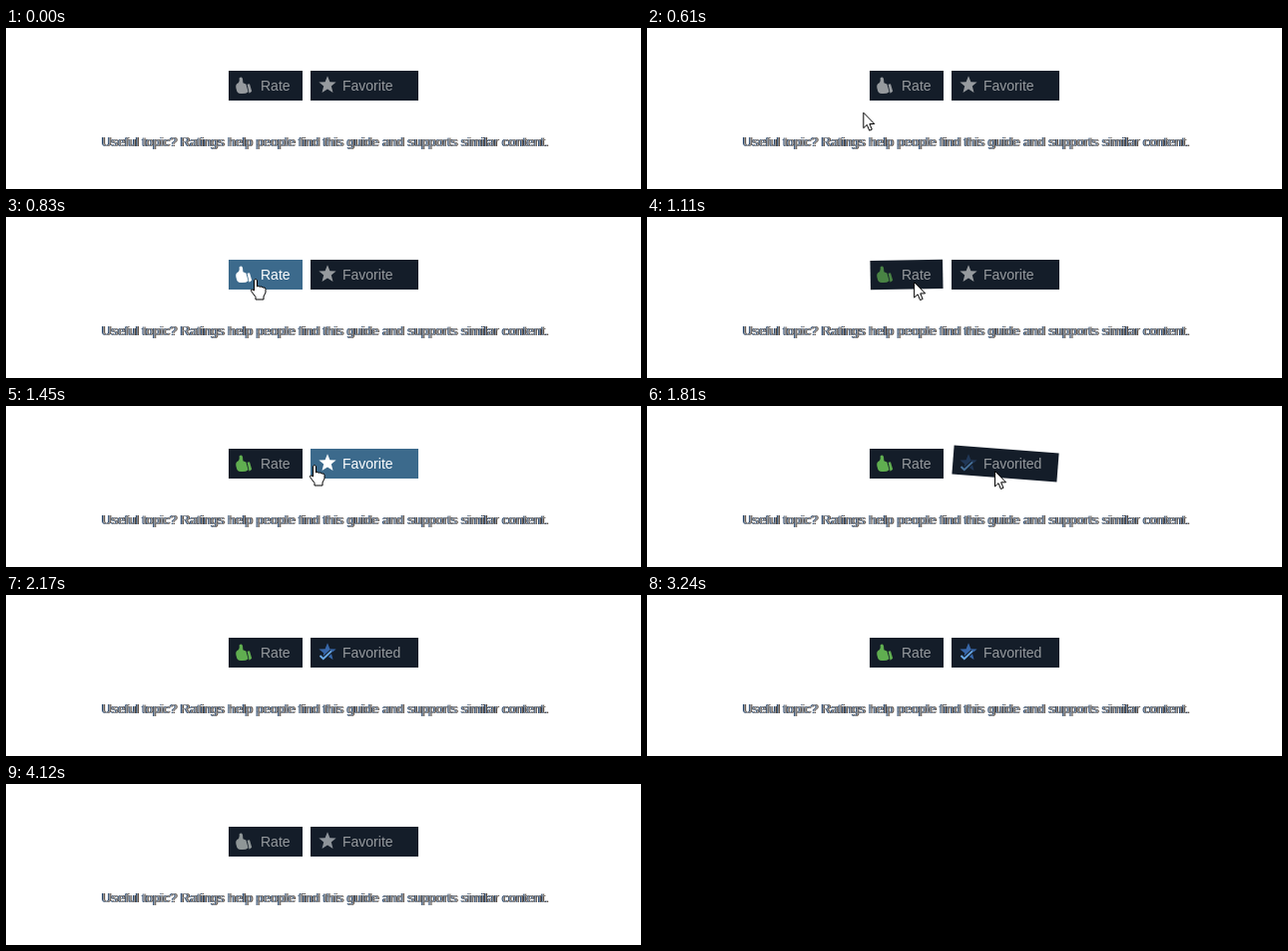
An HTML page for the animation above (4180 ms loop, 636 by 162 pixels).

```html
<!DOCTYPE html>
<html lang="en">
<head>
<meta charset="utf-8">
<title>Rate and favorite</title>
<style>
  html, body { margin: 0; width: 100%; height: 100%; overflow: hidden; background: #fff; }
  svg { display: block; width: 636px; height: 162px; }
  text { font: 14px "Liberation Sans", Arial, sans-serif; }
  .note { font-size: 13px; }
  #cursor path { fill: #fff; stroke: #000; stroke-linejoin: round; }
</style>
</head>
<body>
<svg viewBox="0 0 636 162">
  <defs>
    <g id="thumb">
      <path d="M233.6 50.6Q235.6 48.4 237 51L237.4 55.2 240.4 56.6 242.6 64.2Q240 66.6 235 66Q231.4 65.8 230.8 62Q229.4 57.6 231.4 56Q234.4 55 233.6 50.6Z"/>
      <path d="M241.6 56.8L244 56.2 246.2 63.8 243.6 65.8Z"/>
    </g>
    <path id="star" d="M322 48.3L324.4 54.3 330.6 54.6 325.8 58.6 327.5 65 322 61.4 316.5 65 318.2 58.6 313.4 54.6 319.6 54.3Z"/>
  </defs>

  <g id="rate">
    <rect x="223" y="43" width="74" height="30"/>
    <use class="off" href="#thumb"/>
    <use class="on" href="#thumb" fill="#60ae50"/>
    <text x="255" y="63">Rate</text>
  </g>

  <g id="favorite">
    <rect x="305" y="43" width="108" height="30"/>
    <use class="off" href="#star"/>
    <g class="on">
      <use href="#star" fill="#3766a8"/>
      <path d="M314.5 61L317.8 64.2 326 56.4" fill="none" stroke="#141d29" stroke-width="4"/>
      <path d="M314.5 61L317.8 64.2 326 56.4" fill="none" stroke="#6aa9e6" stroke-width="2"/>
    </g>
    <text x="337" y="63">Favorite<tspan class="on">d</tspan></text>
  </g>

  <g class="note">
    <text class="note" x="95" y="119" fill="#27476e">Useful topic? Ratings help people find this guide and supports similar content.</text>
    <text class="note" x="97" y="119" fill="#5a4a3c" aria-hidden="true">Useful topic? Ratings help people find this guide and supports similar content.</text>
    <text class="note" x="96" y="119" fill="#8e959e" aria-hidden="true">Useful topic? Ratings help people find this guide and supports similar content.</text>
  </g>

  <g id="cursor">
    <path id="arrow" d="M.5 .5V16L4 12.7 6.4 18.5 9 17.4 6.6 11.8H11.5Z"/>
    <path id="hand" d="M-1.5 1.5Q0-.5 1.5 1.5V8Q3 6.8 4.3 8.3 6 7.2 7.2 9 9.5 8.2 10 10.5V14L8 18V21H0V18.5L-4.5 12.5Q-5 9.5-1.5 12Z"/>
  </g>
</svg>

<script>
const LOOP = 4180, SHAKE = 400;
const ENTER = 510, LEAVE = 2170;
const RESET = 3240, RESET_END = 4150;
const $ = id => document.getElementById(id);
const clamp = v => Math.max(0, Math.min(1, v));

// time, x, y of the pointer tip
const route = [
  [510, 201, 95], [830, 250, 62], [900, 252, 62], [1060, 261, 66],
  [1450, 309, 59], [1640, 339, 57], [1700, 341, 58], [1810, 348, 65], [2150, 383, 95]
];
const buttons = [
  { el: $("rate"), x: 223, w: 74, click: 900 },
  { el: $("favorite"), x: 305, w: 108, click: 1660 }
];

function pointerAt(t) {
  let i = 1;
  while (i < route.length - 1 && t > route[i][0]) i++;
  const [t0, x0, y0] = route[i - 1], [t1, x1, y1] = route[i];
  const k = clamp((t - t0) / (t1 - t0));
  return [x0 + (x1 - x0) * k, y0 + (y1 - y0) * k];
}

function drawButton({ el, x, w, click }, t, px, py) {
  const since = t - click, clicked = since >= 0;
  const hover = t >= ENTER && !clicked && px >= x && px < x + w && py >= 43 && py < 73;
  const back = clamp((t - RESET) / (RESET_END - RESET));
  const ink = hover ? "#fff" : "#969a9e";

  const left = clicked ? clamp(1 - since / SHAKE) : 0;
  const angle = -7 * left * Math.sin(since * Math.PI / 100);
  const rect = el.querySelector("rect");
  rect.setAttribute("fill", hover ? "#3c6a8c" : "#141d29");
  rect.setAttribute("transform",
    `translate(${x + w / 2} 58) rotate(${angle}) scale(${1 - .04 * left}) translate(${-x - w / 2} -58)`);

  el.querySelector("text").setAttribute("fill", ink);
  const off = el.querySelector(".off");
  off.setAttribute("fill", ink);
  off.setAttribute("opacity", clicked ? back : 1);
  for (const on of el.querySelectorAll(".on")) {
    const shown = on.tagName === "tspan" ? +clicked : clamp(since / 250);
    on.style.opacity = shown * (1 - back);
    on.style.fillOpacity = shown * (on.tagName === "tspan" ? 1 - back : 1);
  }
  return hover;
}

function draw(t) {
  const [x, y] = pointerAt(t);
  const hover = buttons.map(b => drawButton(b, t, x, y)).some(Boolean);
  $("cursor").setAttribute("transform", `translate(${x} ${y})`);
  $("cursor").setAttribute("opacity", clamp(Math.min(t - ENTER, LEAVE - t) / 90));
  $("hand").style.display = hover ? "" : "none";
  $("arrow").style.display = hover ? "none" : "";
}

let start;
function tick(now) {
  start ??= now;
  draw((now - start) % LOOP);
  requestAnimationFrame(tick);
}
draw(0);
requestAnimationFrame(tick);
</script>
</body>
</html>
```
